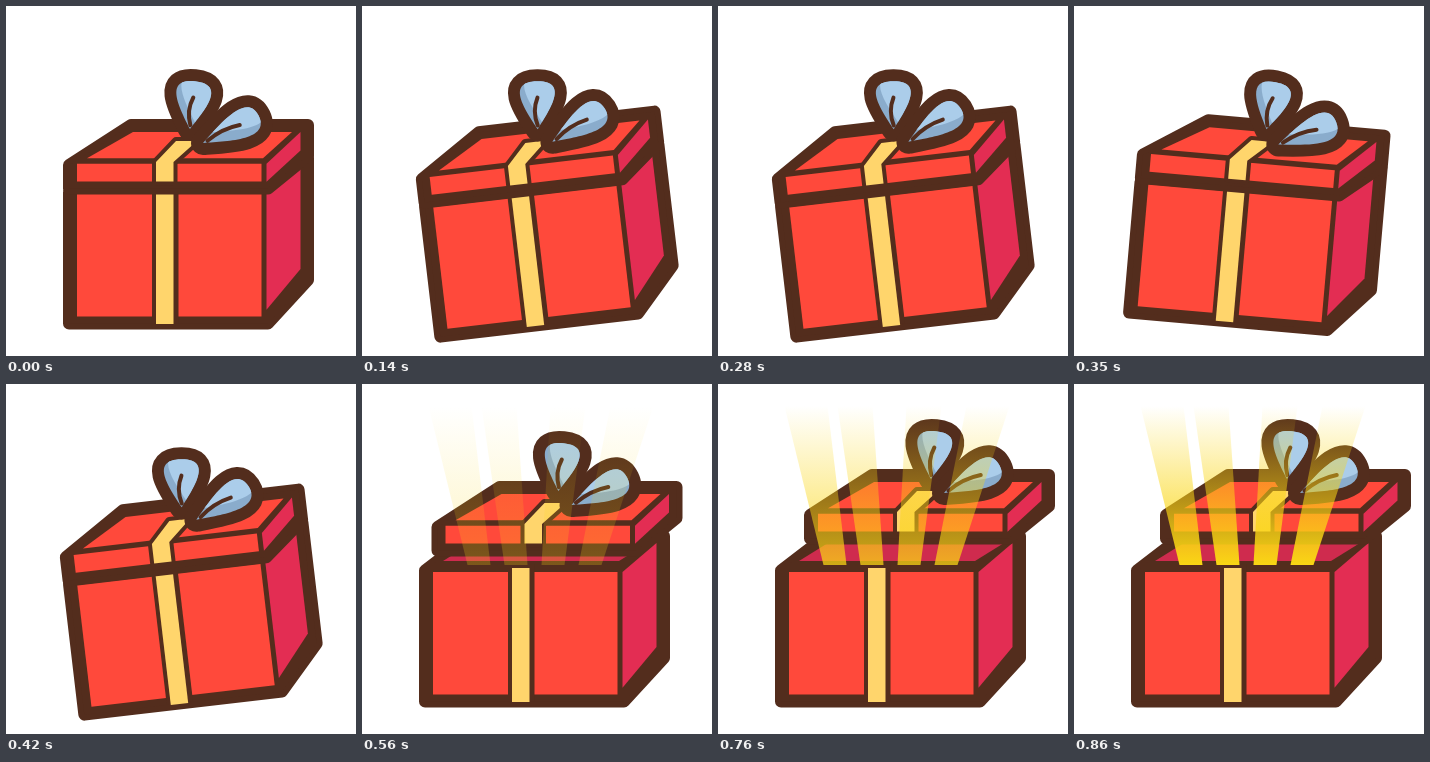
An HTML page with a canvas for the animation above (1960 ms loop, 350 px wide and 350 px high).

```html
<!DOCTYPE html>
<html lang="en">
<head>
<meta charset="utf-8">
<title>Gift box</title>
<style>
html, body { margin: 0; width: 100%; height: 100%; overflow: hidden; background: #fff; }
canvas { display: block; width: 350px; height: 350px; }
</style>
</head>
<body>
<canvas id="stage"></canvas>
<script>
const SIZE = 350, LOOP = 1960, STEP = 70, OPEN_STEP = 100;
const OPEN_AT = 560, WIDE_AT = OPEN_AT + OPEN_STEP;
const BROWN = '#532d1d', RED = '#ff493b', SIDE = '#e32d53', INNER = '#cf2b4e',
      RIBBON = '#ffd56c', BLUE = '#abcdea', SHADE = '#8aaccc';
const LEFT = 63, RIGHT = 262, BACK = 302, LINE = 12;   // shared by body and lid
const TAPE = 150, TAPE_END = 167.5;

const canvas = document.getElementById('stage');
const ctx = canvas.getContext('2d');
const ratio = window.devicePixelRatio || 1;
canvas.width = canvas.height = SIZE * ratio;
ctx.lineJoin = ctx.lineCap = 'round';

function poly(fill, points, line = 0) {
  ctx.beginPath();
  for (const [x, y] of points) ctx.lineTo(x, y);
  ctx.closePath();
  if (line) {
    ctx.strokeStyle = BROWN;
    ctx.lineWidth = line;
    ctx.stroke();
  }
  ctx.fillStyle = fill;
  ctx.fill();
}

function rect(fill, x1, y1, x2, y2) {
  ctx.fillStyle = fill;
  ctx.fillRect(x1, y1, x2 - x1, y2 - y1);
}

// A cuboid in perspective. lip: the front top edge, rim: half the thickness of its line.
function crate({ lip, bottom, backLeft, backTop, backBottom, rim, top }) {
  const edge = RIGHT - 1.5, inner = BACK - 7.5, far = backTop + 7;
  poly(BROWN, [[LEFT, lip + 4], [backLeft, backTop], [BACK, backTop],
               [BACK, backBottom], [RIGHT, bottom], [LEFT, bottom]], LINE);
  poly(top, [[backLeft + 2, far], [BACK - 16, far],
             [RIGHT - 5, lip - rim], [LEFT + 18, lip - rim]]);
  rect(RED, LEFT + 8, lip + rim, RIGHT - 6.5, bottom - 7);
  poly(SIDE, [[edge, lip + rim], [inner, far],
              [inner, backBottom - 2 * rim], [edge, bottom - 2.5 * rim]]);
}

function drawBody() {
  crate({ lip: 182.5, bottom: 317.5, backLeft: 108, backTop: 152, backBottom: 274, rim: 5.5, top: INNER });
  rect(BROWN, TAPE - 4, 180, TAPE_END + 5, 317);
  rect(RIBBON, TAPE, 184, TAPE_END, 318);
}

function drawLid() {
  crate({ lip: 155, bottom: 182.5, backLeft: 125, backTop: 119, backBottom: 150, rim: 2.75, top: RED });
  poly(RIBBON, [[170, 135], [191, 135], [TAPE_END, 156], [TAPE_END, 175.5],
                [TAPE, 175.5], [TAPE, 156]], 8);
  drawBow();
}

// Petals grow upwards from their tip before being turned.
const PETALS = [
  { x: 184, y: 123, turn: 6, len: 48, width: 35, lit: 0.12 },
  { x: 197, y: 137, turn: 64, len: 62, width: 29, lit: -0.25 }
];

function petalPath({ len, width }) {
  const a = width * 0.35, c = width * 0.92, b = len * 0.4;
  return new Path2D(`M0 0 C${-a} ${-b} ${-c} ${-len} 0 ${-len} C${c} ${-len} ${a} ${-b} 0 0Z`);
}

function onPetal(petal, paint) {
  ctx.save();
  ctx.translate(petal.x, petal.y);
  ctx.rotate(petal.turn * Math.PI / 180);
  paint(petalPath(petal), petal);
  ctx.restore();
}

function outlinePetal(path) {
  ctx.strokeStyle = BROWN;
  ctx.lineWidth = 24;
  ctx.stroke(path);
}

function fillPetal(path, { len, width, lit }) {
  ctx.fillStyle = SHADE;
  ctx.fill(path);
  ctx.save();
  ctx.clip(path);
  ctx.translate(lit * width, -0.15 * len);
  ctx.fillStyle = BLUE;
  ctx.fill(path);
  ctx.restore();
  ctx.lineWidth = 4;
  ctx.strokeStyle = BROWN;
  ctx.stroke(new Path2D(`M0 ${-len * 0.66} Q${-width * 0.16} ${-len * 0.38} 0 ${-len * 0.08}`));
}

function drawBow() {
  for (const petal of PETALS) onPetal(petal, outlinePetal);
  for (const petal of PETALS) onPetal(petal, fillPetal);
}

const LEAN = [-29, -17, 15, 42];

function drawBeams(alpha) {
  const top = 22, bottom = 181;
  const glow = ctx.createLinearGradient(0, top, 0, bottom);
  glow.addColorStop(0, 'rgba(250,214,20,0)');
  glow.addColorStop(1, 'rgba(250,214,20,1)');
  ctx.globalAlpha = alpha;
  LEAN.forEach((lean, i) => {
    const x = 117 + 37 * i, foot = 11.5, head = 15.5 + 4 * Math.abs(i - 1.5);
    poly(glow, [[x + lean - head, top], [x + lean + head, top], [x + foot, bottom], [x - foot, bottom]]);
  });
  ctx.globalAlpha = 1;
}

function pose(t) {
  const still = { tilt: 0, shift: 0, lid: [0, 0], light: 0 };
  if (t < STEP) return still;
  if (t < OPEN_AT) {
    const right = Math.floor(t / STEP) % 2;
    return { ...still, tilt: right ? 5 : -6.7, shift: right ? 2.5 : 0 };
  }
  const n = Math.min(3, Math.floor((t - OPEN_AT) / OPEN_STEP));
  return { ...still, lid: t < WIDE_AT ? [12.5, -16] : [29, -28], light: (n + 1) / 4 };
}

function draw(t) {
  const { tilt, shift, lid, light } = pose(t);
  ctx.setTransform(ratio, 0, 0, ratio, 0, 0);
  rect('#fff', 0, 0, SIZE, SIZE);
  ctx.translate(183 + shift, 193);
  ctx.rotate(tilt * Math.PI / 180);
  ctx.translate(-183, -193);
  drawBody();
  ctx.save();
  ctx.translate(...lid);
  drawLid();
  ctx.restore();
  if (light) drawBeams(light);
}

const start = performance.now();
function tick() {
  draw((performance.now() - start) % LOOP);
  requestAnimationFrame(tick);
}
tick();
</script>
</body>
</html>
```
